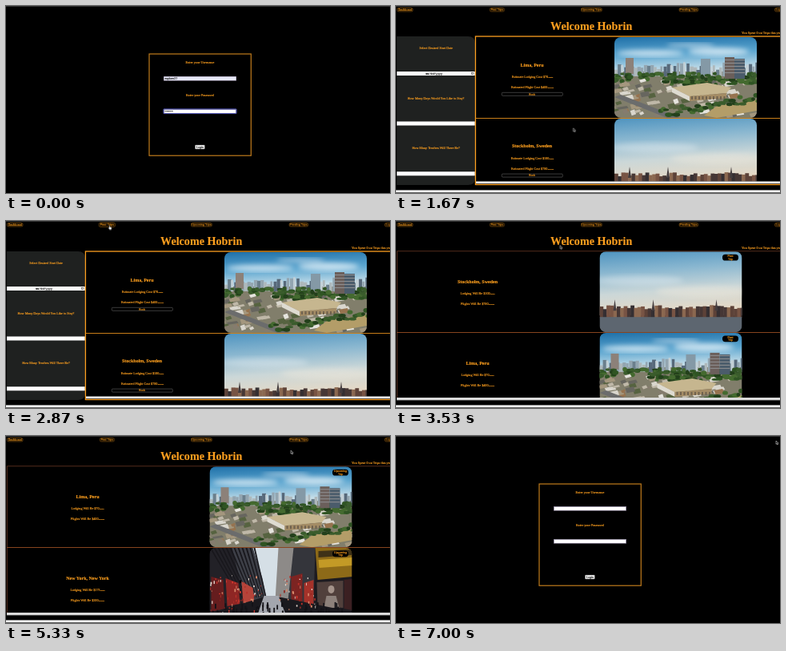
Recreate the animation shown at these times as an HTML page. Size 480x234 px, loop 7140 ms.

```html
<!DOCTYPE html>
<html lang="en">
<head>
<meta charset="utf-8">
<title>Trip planner walkthrough</title>
<style>
  html, body { margin: 0; height: 100%; overflow: hidden; background: #000; }
  svg { display: block; width: 100vw; height: 100vh; }
  text { font-family: "Liberation Serif", Times, serif; fill: #fb9e1f; stroke: #fb9e1f; stroke-width: .13px; text-anchor: middle; }
  .sans { font-family: "Liberation Sans", Arial, sans-serif; }
  .mono { font-family: "Liberation Mono", monospace; }
  .bold { font-weight: 700; }
  .left { text-anchor: start; }
  .dark { fill: #111; stroke: #111; }
  .nav { transform-box: fill-box; transform-origin: center; }
</style>
</head>
<body>
<svg id="stage" viewBox="0 0 480 234"></svg>
<script>
const LOOP = 7140;
const ORANGE = '#fb9e1f';
const rules = [];

const pct = ms => (ms / LOOP * 100).toFixed(3) + '%';

function animate(id, frames, timing) {
  rules.push(`@keyframes ${id}{${frames.join('')}}#${id}{animation:${id} ${LOOP}ms ${timing} infinite}`);
}

// Switches a property on inside the given time windows, with hard edges.
function toggle(id, windows, on = 'opacity:1', off = 'opacity:0') {
  const frames = [`0%{${off}}`];
  for (const [from, to] of windows) {
    frames.push(`${pct(from)}{${on}}`);
    if (to < LOOP) frames.push(`${pct(to)}{${off}}`);
  }
  animate(id, frames, 'step-end');
}

const text = (x, y, size, str, cls = '') =>
  `<text x="${x}" y="${y}" font-size="${size}" class="${cls}">${str}</text>`;
const rect = (x, y, w, h, fill, extra = '') =>
  `<rect x="${x}" y="${y}" width="${w}" height="${h}" fill="${fill}" ${extra}/>`;
const poly = (points, fill) => `<polygon points="${points}" fill="${fill}"/>`;
const oval = (x, y, rx, ry, fill) =>
  `<ellipse cx="${x}" cy="${y}" rx="${rx}" ry="${ry}" fill="${fill}"/>`;
const group = (id, ...parts) => `<g id="${id}">${parts.join('')}</g>`;
const repeat = (n, fn) => Array.from({ length: n }, (_, i) => fn(i)).join('');

function random(seed) {
  return (min = 0, max = 1) => {
    seed = (seed * 16807) % 2147483647;
    return +(min + (max - min) * seed / 2147483647).toFixed(2);
  };
}
const pick = (rnd, list) => list[Math.floor(rnd() * list.length)];

function gradient(id, ...colors) {
  const stops = colors.map((c, i) => `<stop offset="${i / (colors.length - 1)}" stop-color="${c}"/>`);
  return `<linearGradient id="${id}" x2="0.15" y2="1">${stops.join('')}</linearGradient>`;
}

// Photos, each 178 by 101
const photo = (id, ...parts) => `<g id="${id}" clip-path="url(#frame)">${parts.join('')}</g>`;
const place = (id, x, y) => `<use href="#${id}" x="${x}" y="${y}"/>`;

function lima() {
  const rnd = random(4711);
  const walls = ['#d9d6cd', '#bfb8a8', '#a4977e', '#857c6e', '#e6e4de', '#96734f', '#67665f', '#566340'];
  const far = ['#c3d0d6', '#93a5b0', '#6b7f8c', '#aeb8bb', '#57697a'];
  const greens = ['#2f5423', '#446a2f', '#23401b', '#3a5c2c'];
  const tree = (x, y) => oval(x, y, rnd(2, 5), rnd(1.5, 3), pick(rnd, greens));
  return photo('lima',
    rect(0, 0, 178, 46, 'url(#blue)'),
    '<g filter="url(#soft)" opacity=".65">',
    oval(45, 20, 42, 4, '#fff'), oval(130, 18, 38, 5, '#fff'),
    oval(95, 10, 30, 2, '#fff'), '</g>',
    rect(0, 43, 178, 58, '#817e6b'),
    repeat(44, i => {
      const h = rnd(5, 15);
      return rect(i * 4.1, 46 - h, rnd(2.5, 5), h + 3, pick(rnd, far));
    }),
    rect(14, 26, 10, 20, '#8c8179'), rect(108, 27, 12, 21, '#8499a6'),
    repeat(30, () => tree(rnd(0, 75), rnd(45, 55))),
    repeat(110, () => {
      const x = rnd(-8, 172), y = rnd(53, 97), w = rnd(4, 13), h = rnd(2, 6);
      return poly(`${x},${y} ${x + w},${y - 2} ${x + w + 2},${y + h - 2} ${x + 2},${y + h}`, pick(rnd, walls));
    }),
    repeat(100, () => tree(rnd(62, 178), rnd(45, 60))),
    rect(138, 25, 12, 27, '#6b5f5b'), rect(150, 27, 13, 25, '#4b5c6b'),
    repeat(5, i => rect(138, 28 + i * 4, 25, 1, '#8f9092')),
    poly('72,63 116,57 146,63 140,70 94,74', '#c6b68f'),
    poly('72,63 94,74 94,80 72,69', '#dedbd1'),
    poly('94,74 140,70 140,76 94,80', '#a48c65'),
    repeat(10, i => rect(96 + i * 4.5, 74, 2, 4, '#6f614e')),
    poly('0,75 8,72 82,101 66,101', '#6b6c6c'),
    poly('112,98 128,86 178,78 178,92 128,101', '#b39d68'),
    repeat(38, i => tree(58 + i * 3.3, 96 - i * .5 + rnd(-6, 5))));
}

function stockholm() {
  const rnd = random(90210);
  return photo('stockholm',
    rect(0, 0, 178, 80, 'url(#dusk)'),
    '<g filter="url(#soft)" opacity=".3">',
    oval(50, 36, 55, 6, '#fff'), oval(130, 50, 60, 7, '#fff1de'), '</g>',
    repeat(42, i => {
      const h = rnd(10, 16);
      return rect(i * 4.3, 83 - h, 4.8, h, pick(rnd, ['#5d4238', '#785444', '#463735', '#8b6850', '#352f32']));
    }),
    [19, 67, 146].map(x => poly(`${x - 2},74 ${x},60 ${x + 2},74`, '#433c3e')).join(''),
    rect(0, 82, 178, 19, '#5d6670'));
}

function newYork() {
  const rnd = random(1234);
  const lights = ['#d63a30', '#92241f', '#b8302a', '#d98a6c', '#e8dcd2'];
  return photo('newyork',
    rect(0, 0, 178, 101, '#1d1b20'),
    poly('50,0 90,0 88,40 84,66 68,66 62,35', '#d5dfe6'),
    poly('86,0 110,0 106,64 82,66', '#8d8a88'),
    poly('105,0 132,0 130,70 98,66', '#34353b'),
    poly('0,0 28,0 44,66 0,84', '#222127'),
    poly('28,0 54,0 66,38 72,66 44,66', '#3d3f47'),
    repeat(12, i => poly(`${i * 5},0 ${i * 5 + 2},0 ${i * 3 + 38},62 ${i * 3 + 37},62`, '#18171c')),
    poly('2,36 17,40 19,76 2,80', '#651d1e'),
    poly('20,38 36,44 38,70 22,73', '#8e2624'),
    poly('40,42 54,50 56,68 42,70', '#b5443a'),
    poly('102,36 116,32 116,70 102,68', '#7c2422'),
    poly('118,44 130,40 130,74 118,72', '#a5322a'),
    poly('132,0 178,0 178,36 135,40', '#8d6a18'),
    poly('136,15 178,12 178,22 137,25', '#c39a26'),
    poly('136,4 178,2 178,9 136,12', '#3e3117'),
    poly('134,43 167,41 167,75 135,73', '#51403c'),
    oval(152, 52, 4, 5, '#a4938a'), poly('143,75 146,60 158,60 162,75', '#8d817b'),
    poly('168,40 178,39 178,78 168,76', '#3b2022'),
    poly('0,82 66,62 90,62 178,80 178,101 0,101', '#1a191e'),
    poly('68,60 86,60 102,101 54,101', '#a3a6ae'),
    repeat(70, () => rect(rnd(0, 66), rnd(34, 82), rnd(.6, 2), rnd(.8, 4), pick(rnd, lights))),
    repeat(45, () => rect(rnd(86, 132), rnd(34, 78), rnd(.6, 2), rnd(.8, 4), pick(rnd, lights))),
    repeat(60, () => rect(rnd(0, 172), rnd(68, 82), 1.8, rnd(4, 10), '#131217')));
}

// Page parts
const small = str => `<tspan font-size="2.6">${str}</tspan>`;
const scrollbar = (x, y, h, color) => rect(x, y, 480 - x, h, color);

function navButton(id, x, w, label) {
  return `<g id="${id}" class="nav">` +
    rect(x, 2.5, w, 4.4, '#000', 'rx="1.8" stroke="#d98a1c" stroke-width=".45"') +
    text(x + w / 2, 5.9, 3.5, label, 'sans') + '</g>';
}

const header = () => group('header',
  navButton('dashboard', 1.5, 19.5, 'Dashboard'),
  navButton('past', 117.3, 18, 'Past Trips'),
  navButton('upcoming', 231.3, 26, 'Upcoming Trips'),
  navButton('pending', 354, 23.5, 'Pending Trips'),
  navButton('logout', 473.5, 15, 'Log Out'),
  text(244.2, 30, 14.1, 'Welcome Hobrin', 'bold'),
  text(432, 34.6, 4.2, 'You Spent 0 on Trips this year', 'left'),
  scrollbar(0, 230.4, 3, '#f2f2f2'));

function offer(y, city, night, flight) {
  return text(170, y + 37.5, 6, city, 'bold') +
    text(170.5, y + 52, 4.15, `Estimate Lodging Cost $${night}${small('/night')}`) +
    text(170.5, y + 64.7, 4.15, `Estimated Flight Cost $${flight}${small('/person')}`) +
    rect(132.3, y + 70.3, 76, 4, '#000', 'rx="1" stroke="#777" stroke-width=".5"') +
    text(170, y + 73.5, 3.4, 'Book', 'sans');
}

function question(y, str) {
  return text(50, y, 4.15, str) + rect(1, y + 28, 97.7, 5, '#fff');
}

const dashboardPage = () => group('home',
  `<path d="M1 38H90Q99 38 99 47V215Q99 224 90 224H1Z" fill="#1f2120"/>`,
  question(54, 'Select Desired Start Date'),
  question(116.5, 'How Many Days Would You Like to Stay?'),
  question(179.3, 'How Many Travlers Will There Be?'),
  text(47.5, 85.8, 3.5, 'mm/dd/yyyy', 'mono dark'),
  rect(94.5, 83.3, 2.3, 2.3, 'none', 'stroke="#222" stroke-width=".5"'),
  offer(38, 'Lima, Peru', 70, 400),
  offer(139.8, 'Stockholm, Sweden', 100, 780),
  group('offers', place('lima', 273, 39), place('stockholm', 273, 141)),
  rect(99, 140, 381, .8, ORANGE),
  rect(100, 219.5, 380, 14.5, '#000'), scrollbar(100, 219.5, 2.7, '#fafafa'),
  rect(99.4, 38, 390, 185.5, 'none', `stroke="${ORANGE}" stroke-width="1.3"`));

function trip(y, photoId, city, lines, badge) {
  const top = y + (lines.length > 2 ? 34 : 40);
  return text(102, top, 6, city, 'bold') +
    lines.map((line, i) => text(102, top + 14.2 + i * 12.7, 4.15, line)).join('') +
    place(photoId, 254.5, y) +
    rect(408, y + 3.5, 20, 7.8, '#000', 'rx="3.6"') +
    text(418, y + 6.8, 3.5, badge, 'sans') + text(418, y + 10.4, 3.5, 'Trip', 'sans');
}

function tripPage(id, badge, trips) {
  const cards = trips.map(([photoId, city, night, flight, total], i) => {
    const lines = [`Lodging Will Be $${night}${small('/night')}`, `Flights Will Be $${flight}${small('/person')}`];
    if (total) lines.push(`This trip will cost an estimate of $${total}${small('/total')}`);
    return trip(38.2 + i * 101.7, photoId, city, lines, badge);
  });
  return group(id, ...cards,
    rect(1, 139, 479, .7, '#c0602c'),
    rect(0, 221, 480, 13, '#000'), scrollbar(1, 221, 3.3, '#dadada'),
    `<path d="M480 37.7H1.4V221" fill="none" stroke="#8a4a30" stroke-width=".6"/>`);
}

const field = y => rect(197.3, y, 90.4, 4.9, '#fff', 'stroke="#8d83a0" stroke-width=".6"');

const loginPage = () => group('login',
  rect(179, 60, 127.3, 127.2, 'none', 'stroke="#c17c1c" stroke-width="1.2"'),
  text(242.5, 71.8, 4.2, 'Enter your Username'),
  text(242.5, 112.8, 4.2, 'Enter your Password'),
  field(88.3), field(129.3),
  rect(236.5, 174, 11.8, 4.9, '#f1f1f1', 'rx=".6" stroke="#888" stroke-width=".4"'),
  text(242.4, 177.7, 3.5, 'Login', 'sans dark'),
  group('filled',
    rect(197.6, 88.6, 89.8, 4.3, '#e6e7f7'),
    text(198.4, 91.9, 3.3, 'explorer27', 'sans dark left'),
    text(198.4, 133, 3.3, '•'.repeat(9), 'sans dark left')),
  group('focus', rect(196.9, 128.9, 91.2, 5.7, 'none', 'rx=".6" stroke="#5055b8" stroke-width="1"')));

const cursor = () => group('cursor',
  group('arrow', `<path d="M0 0V4.3L1 3.4L1.7 4.9L2.5 4.5L1.8 3.1H3.1Z" fill="#111" stroke="#fff" stroke-width=".45"/>`),
  group('hand', `<path d="M.9 .3Q1.6 -.2 1.8 .6V2L4 2.5Q4.5 4 3.5 5.2H1.5L-.2 3.3Q0 2.5 1 3Z" fill="#fff" stroke="#222" stroke-width=".35"/>`));

document.getElementById('stage').innerHTML = [
  '<defs>',
  gradient('blue', '#1f70a8', '#5ca6d0', '#d3e5ec'),
  gradient('dusk', '#4f94c0', '#8ab7d0', '#cbd7d8', '#e5d9c6'),
  '<filter id="soft"><feGaussianBlur stdDeviation="3"/></filter>',
  '<clipPath id="frame"><rect width="178" height="101" rx="8"/></clipPath>',
  lima(), stockholm(), newYork(),
  '</defs>',
  rect(0, 0, 480, 234, '#000'),
  loginPage(),
  dashboardPage(),
  tripPage('pastPage', 'Past', [
    ['stockholm', 'Stockholm, Sweden', 100, 780], ['lima', 'Lima, Peru', 70, 400]]),
  tripPage('upcomingPage', 'Upcoming', [
    ['lima', 'Lima, Peru', 70, 400], ['newyork', 'New York, New York', 175, 200]]),
  tripPage('pendingPage', 'Pending', [
    ['lima', 'Lima, Peru', 70, 400, 6435], ['newyork', 'New York, New York', 175, 200, 3720]]),
  header(),
  rect(0, 0, 480, .8, '#3c3c3c'),
  cursor()
].join('');

// Timeline in ms
toggle('login', [[0, 1470], [6930, LOOP]]);
toggle('filled', [[0, 1470]]);
toggle('focus', [[0, 1330]]);
toggle('header', [[1470, 6930]]);
toggle('home', [[1470, 2930]]);
toggle('offers', [[1530, 2930]]);
toggle('pastPage', [[2930, 4470]]);
toggle('upcomingPage', [[4470, 5600]]);
toggle('pendingPage', [[5600, 6930]]);

const hovers = { past: [2530, 3130], upcoming: [4130, 4730], pending: [5470, 5970], logout: [6470, 6930] };
for (const id in hovers) toggle(id, [hovers[id]], 'transform:scale(1.13)', 'transform:none');

const pointing = [[1270, 1670], ...Object.values(hovers)];
toggle('hand', pointing);
toggle('arrow', pointing, 'opacity:0', 'opacity:1');

const path = [
  [0, 192, 240], [329, 192, 240], [330, 192, 229], [530, 203, 199], [610, 203, 199],
  [870, 299, 183], [1010, 299, 183], [1330, 241, 176], [1610, 241, 176],
  [1930, 139, 54], [2330, 134, 18], [2730, 128, 5.5], [3010, 128, 5.5],
  [3270, 180, 60], [3730, 224, 8], [3870, 228, 7.5], [4010, 228, 7.5],
  [4200, 239, 5.5], [4610, 239, 5.5], [4930, 272, 70], [5330, 356, 18],
  [5600, 365, 5], [5900, 365, 5], [6070, 404.5, 14], [6330, 455, 11],
  [6600, 475, 6], [LOOP, 475, 6]
];
animate('cursor', path.map(([t, x, y]) => `${pct(t)}{transform:translate(${x}px,${y}px)}`), 'linear');

document.head.appendChild(document.createElement('style')).textContent = rules.join('\n');
</script>
</body>
</html>
```
